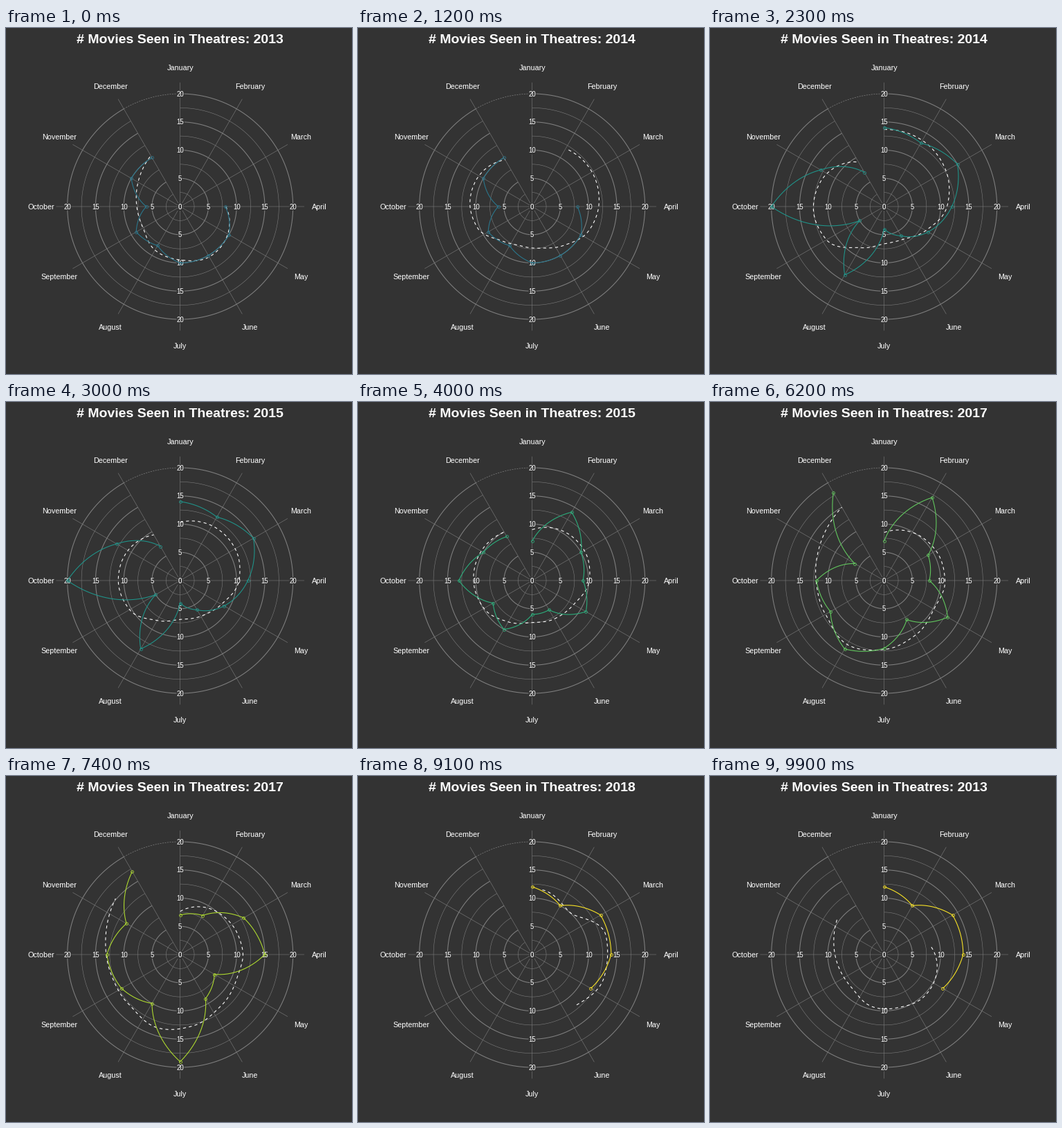
Write a matplotlib script that moves like this. It is 500 by 500 pixels and loops after 10000 ms.

```python
import numpy as np
import matplotlib.pyplot as plt
from matplotlib.animation import FuncAnimation

SIZE, DPI = 500, 100
PX = 72 / DPI                      # points per pixel
BG, GREY = "#333333", "#7f7f7f"
CX, CY, UNIT = 251.7, 258.0, 8.15
PERIOD, HOLD = 17, 5

MONTHS = ["January", "February", "March", "April", "May", "June", "July",
          "August", "September", "October", "November", "December"]
# year: (first month, monthly counts)
SEEN = {
    2013: (4, [8, 10, 10, 10, 8, 9, 6, 10, 10]),
    2014: (1, [14, 13, 15, 12, 9, 6, 4, 14, 5, 20, 13, 7]),
    2015: (1, [7, 14, 10, 9, 11, 6, 6, 10, 8, 13, 10, 9]),
    2016: (1, [7, 17, 9, 8, 13, 8, 12, 14, 11, 12, 6, 18]),
    2017: (1, [7, 8, 13, 15, 7, 9, 19, 10, 12, 13, 11, 17]),
    2018: (1, [12, 10, 14, 14, 12]),
}
YEARS = list(SEEN)
COLORS = plt.get_cmap("viridis")(np.linspace(0.4, 1, len(YEARS)))


def polar(month, r):
    a = np.radians((np.asarray(month) - 1) * 30)
    r = np.asarray(r) * UNIT
    return CX + r * np.sin(a), CY - r * np.cos(a)


def local_fit(x, y, at, q):
    """Value and slope at one point of a tricube-weighted quadratic."""
    d = x - at
    h = np.sort(abs(d))[q - 1]
    u = abs(d) / h
    w = np.where(u < 0.999, (1 - np.minimum(u, 1) ** 3) ** 3, 0) ** 0.5
    cols = np.stack([w, w * d, w * d * d], axis=1)
    norm = np.linalg.norm(cols, axis=0)
    norm[norm < 1e-9] = 1
    coef = np.linalg.lstsq(cols / norm, w * y, rcond=1e-6)[0] / norm
    return coef[:2]


def loess(x, y, span=0.75, n=80):
    """Local regression at knots, blended with cubic Hermite pieces."""
    q = int(len(x) * span)
    margin = 0.005 * (x[-1] - x[0])
    knots = np.concatenate([[x[0] - margin], x[1:-1], [x[-1] + margin]])
    v, s = np.array([local_fit(x, y, k, q) for k in knots]).T
    grid = np.linspace(x[0], x[-1], n)
    i = np.clip(np.searchsorted(knots, grid) - 1, 0, len(knots) - 2)
    h = knots[i + 1] - knots[i]
    t = (grid - knots[i]) / h
    fit = ((1 + 2 * t) * (1 - t) ** 2 * v[i] + t * (1 - t) ** 2 * h * s[i]
           + t * t * (3 - 2 * t) * v[i + 1] + t * t * (t - 1) * h * s[i + 1])
    return np.array([grid, fit])


def series(year):
    start, counts = SEEN[year]
    return start + np.arange(len(counts), dtype=float), np.array(counts, float)


def spiral(x, y):
    xs = np.linspace(x[0], x[-1], 30 * (len(x) - 1) + 1)
    return polar(xs, np.interp(xs, x, y))


DATA = [series(y) for y in YEARS]
PATHS = [spiral(*d) for d in DATA]
DOTS = [polar(*d) for d in DATA]
TRENDS = [loess(*d) for d in DATA]

fig = plt.figure(figsize=(SIZE / DPI, SIZE / DPI), dpi=DPI, facecolor=BG)
ax = fig.add_axes([0, 0, 1, 1])
ax.set_xlim(0, SIZE)
ax.set_ylim(SIZE, 0)
ax.axis("off")


def stroke(x, y, color, width, **kw):
    kw = {"solid_capstyle": "butt", "dash_capstyle": "butt", **kw}
    return ax.plot(x, y, color=color, lw=width * PX, snap=False, **kw)[0]


def label(x, y, text, size, **kw):
    return ax.text(x, y, text, color="white", fontsize=size * PX, ha="center",
                   va="baseline", family="Liberation Sans", **kw)


# grid
for m in range(1, 13):
    stroke(*polar([m, m], [0, 22]), GREY, 0.55, zorder=1)
arc = np.linspace(1, 12, 331)
for r in np.arange(2.5, 20.1, 2.5):
    stroke(*polar(arc, np.full(331, r)), GREY, 1.07 if r % 5 == 0 else 0.55,
           zorder=1)
gap = np.linspace(12, 13, 40)
stroke(*polar(gap, np.full(40, 20)), GREY, 0.7, dashes=(3, 2), zorder=1)

# labels
for m, name in enumerate(MONTHS, 1):
    x, y = polar(m, 24.7)
    label(x, y + 4, name, 10.7, zorder=2)
box = dict(facecolor=BG, edgecolor="none", pad=0.5, alpha=0.65)
for m in (1, 4, 7, 10):
    for r in range(0, 21, 5):
        x, y = polar(m, r)
        label(x, y + 3.6, str(r), 9.6, zorder=2, bbox=box)

title = label(251.2, 22, "", 19.45, weight="bold", zorder=5)
trend = stroke([], [], "white", 1.07, dashes=(4, 4), zorder=3)
path = stroke([], [], "white", 1.07, zorder=4)
dots = stroke([], [], "none", 0, marker="o", ms=3.9 * PX, mfc="none",
              mew=0.75 * PX, zorder=4)


def update(frame):
    k, pos = divmod(frame, PERIOD)
    last = k == len(YEARS) - 1
    nxt = (k + 1) % len(YEARS)
    t = max(0, pos - HOLD) / (10 if last else 11)
    title.set_text(f"# Movies Seen in Theatres: {YEARS[nxt if t > 0.5 else k]}")
    trend.set_data(*polar(*((1 - t) * TRENDS[k] + t * TRENDS[nxt])))
    shown = nxt if t >= 1 else k
    path.set_data(*PATHS[shown])
    path.set_color(COLORS[shown])
    dots.set_data(*DOTS[shown])
    dots.set_markeredgecolor(COLORS[shown])
    return title, trend, path, dots


anim = FuncAnimation(fig, update, frames=100, interval=100, repeat=True,
                     repeat_delay=0, blit=False)
plt.show()
```
